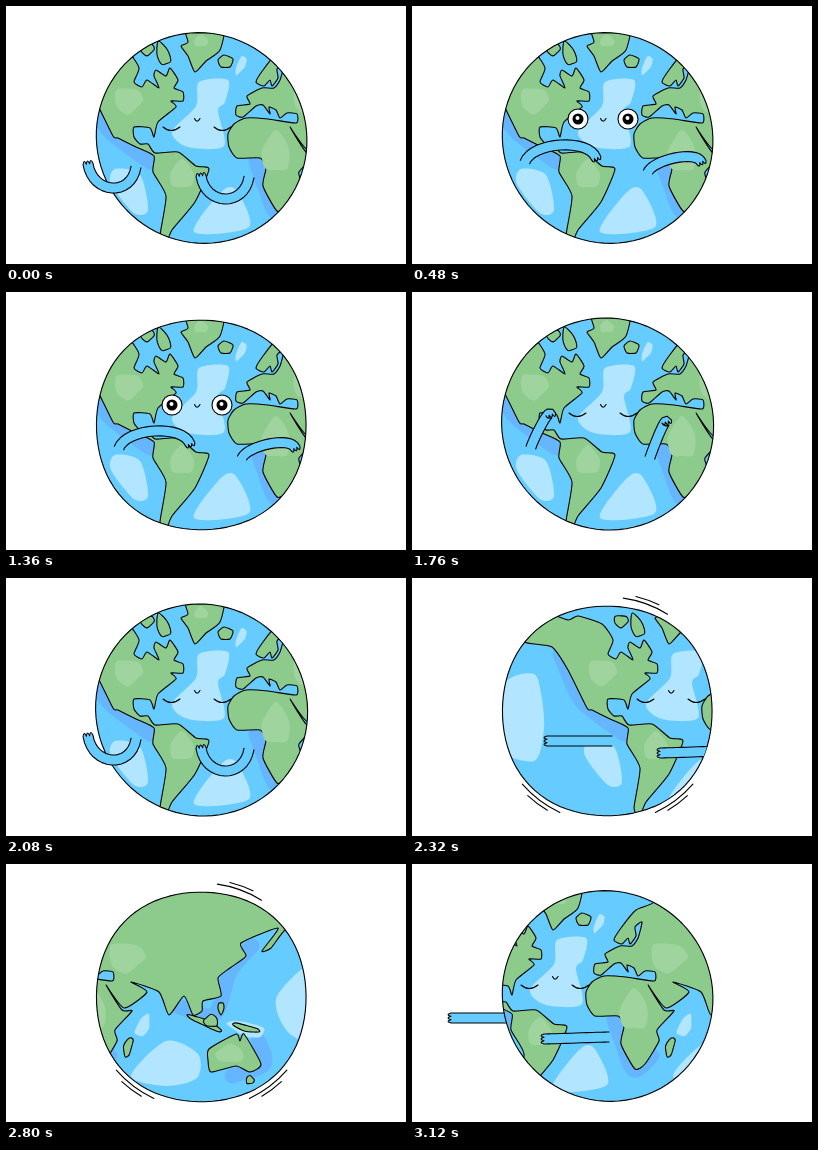
Animation, 400 px wide and 258 px high, one loop 3200 ms. Source, as an HTML page:

```html
<!DOCTYPE html>
<html lang="en">
<head>
<meta charset="utf-8">
<title>Spinning Earth</title>
<style>
  html, body { margin: 0; width: 100%; height: 100%; overflow: hidden; background: #fff; }
  svg { display: block; width: 400px; height: 258px; }
  path, circle { stroke-linecap: round; stroke-linejoin: round; }
  .line { fill: none; stroke: #000; stroke-width: 1.1; }
  .land { fill: #8ccb8c; stroke: #000; stroke-width: 1.1; }
  .arm { fill: #66ccff; stroke: #000; stroke-width: 1.1; }
  .deep { fill: none; stroke: #66b5ff; stroke-width: 15; }
  .foam { fill: #b2e5ff; }
  .meadow { fill: #a0d49e; }
</style>
</head>
<body>
<svg viewBox="0 0 400 258">
  <defs>
    <clipPath id="disc"><path class="outline"/></clipPath>
    <g id="map"></g>
  </defs>
  <path id="sideArm" class="arm" transform="translate(-28 -9)"/>
  <path class="outline" fill="#66ccff"/>
  <g clip-path="url(#disc)">
    <g id="world">
      <use href="#map"/>
      <use href="#map" x="-456"/>
    </g>
  </g>
  <path class="outline line"/>
  <g id="front">
    <g id="body">
      <path id="shut" class="line" d="M157 121q8 7 17 0m34 0q8 7 17 0"/>
      <g id="open">
        <g id="eye">
          <circle cx="166" cy="113" r="10" fill="#fff" stroke="#000" stroke-width="1.1"/>
          <circle cx="166" cy="113" r="5.5"/>
          <circle cx="165.5" cy="112" r="2" fill="#fff"/>
        </g>
        <use href="#eye" x="50"/>
      </g>
      <path class="line" d="M188.5 112.5q2.500 5.500 5.500 0"/>
      <path id="leftArm" class="arm"/>
      <path id="rightArm" class="arm"/>
    </g>
  </g>
  <path id="whoosh" class="line"/>
</svg>
<script>
const FRAME = 80, FRAMES = 40, SWING = 13, SPIN = 27, STEP = 34, LAP = 456;
const RAD = Math.PI / 180;
const $ = id => document.getElementById(id);
const clamp = t => Math.max(0, Math.min(1, t));
const ease = t => t * t * (3 - 2 * t);
const mix = (a, b, t) => a.map((v, i) => v + (b[i] - v) * t);

// Rounded curve through "x y x y ..."; k sets how round it is.
function curve(text, closed, k) {
  const v = text.split(/\s+/).map(Number), n = v.length / 2;
  const at = i => {
    const j = closed ? (i + n) % n : Math.max(0, Math.min(n - 1, i));
    return [v[2 * j], v[2 * j + 1]];
  };
  let d = 'M' + at(0);
  for (let i = 0; i < n - !closed; i++) {
    const [a, b, c, e] = [-1, 0, 1, 2].map(s => at(i + s));
    d += `C${b.map((p, m) => p + (c[m] - a[m]) * k)} ${c.map((p, m) => p - (e[m] - b[m]) * k)} ${c}`;
  }
  return d;
}

// Uneven oval
function blob(x, y, rx, ry, tilt = 0) {
  const pts = [];
  for (let a = 0; a < 360; a += 45) {
    const r = 1 + 0.15 * Math.sin(a * 3 * RAD + x);
    const u = rx * r * Math.cos(a * RAD), w = ry * r * Math.sin(a * RAD);
    const c = Math.cos(tilt * RAD), s = Math.sin(tilt * RAD);
    pts.push(x + u * c - w * s, y + u * s + w * c);
  }
  return curve(pts.join(' '), true, 0.15);
}

function add(cls, d) {
  const p = document.createElementNS('http://www.w3.org/2000/svg', 'path');
  p.setAttribute('class', cls);
  p.setAttribute('d', d);
  $('map').append(p);
}
const shore = s => add('deep', curve(s, false, 0.16));
const foam = s => add('foam', curve(s, true, 0.14));
const land = s => add('land', curve(s, true, 0.1));
const isle = (...b) => add('land', blob(...b));
const meadow = (...b) => add('meadow', blob(...b));

shore('80 76 98 118 114 134 144 156');
shore('250 156 258 178 270 206 288 192');
shore('355 142 392 150 408 108 430 82');
shore('410 212 442 200 436 176');

foam('193 76 222 74 219 96 212 105 218 140 182 141 166 126 190 100');
foam('215 186 230 184 243 221 188 226');
foam('109 163 134 169 142 204 128 207 105 178');
foam('29 101 54 96 61 115 64 150 54 183 12 170 -2 135');
foam('344 177 376 190 375 214 344 222 309 212');
add('foam', blob(235, 59, 4, 10, 25));
add('foam', blob(321, 162, 6, 12, 25));
add('foam', blob(425, 165, 19, 7, 15));

// The Americas
land(`38 36 36 45 44 64 72 69 88 92 107 130 112 132 130 141 148 150 147 166 160 190 154 230
  160 238 166 224 189 196 203 163 190 160 172 146 149 147 142 138 134 138 128 131 128 121 144 122
  148 131 152 116 170 101 165 95 177 95 177 86 168 82 172 74 164 62 160 70 150 64 148 70 153 82
  141 74 136 81 128 76 133 62 122 46 98 38 88 42 64 34`);
// Europe, Africa and Asia
land(`296 12 290 38 272 46 257 64 250 76 258 80 264 74 266 80 272 72 271 63 278 58 274 74 268 82
  256 82 241 90 244 98 231 100 230 109 237 111 250 100 257 99 264 108 263 101 270 104 274 112
  281 107 291 108 290 117 262 113 240 112 228 118 222 128 223 141 231 152 254 152 260 162 257 180
  271 205 281 200 295 177 293 166 310 147 300 146 284 121 302 144 325 128 309 118 337 128 347 151
  362 132 371 151 380 147 381 137 399 132 396 114 408 104 424 92 419 79 456 64 440 87 449 84
  463 66 486 54 465 10`);
// Greenland, Iceland, Australia
land('179 18 182 36 175 40 182 50 189 66 200 55 214 44 218 16');
land('212 54 218 49 227 53 224 61 215 61');
land('386 196 387 185 414 170 418 177 422 170 439 200 428 208 414 202 389 208');

isle(157, 48, 6, 12, -20);   // Arctic
isle(141, 43, 7, 6);
isle(306, 183, 4, 10, 15);   // Madagascar
isle(383, 159, 19, 3, 25);   // Sunda islands
isle(389, 157, 7, 6);
isle(399, 144, 3, 6);
isle(424, 164, 14, 3, 15);   // New Guinea
isle(428, 216, 4, 4);        // Tasmania
isle(462, 212, 4, 11, 30);   // New Zealand

meadow(122, 94, 14, 13);
meadow(176, 169, 12, 14);
meadow(270, 147, 14, 20);
meadow(195, 35, 7, 6);
meadow(304, 93, 18, 15);
meadow(408, 190, 14, 9);

// Arm poses: shoulder x y, hand x y, sag of the curve between them
const CURL = [130, 161, 82, 158, 30];
const REACH = [128, 155, 69, 149, 13];
const FOLD = [113, 156, 184, 152, -20];
const STRAIGHT = [132, 163, 67, 163, 0];

function armPath([sx, sy, hx, hy, sag]) {
  const near = [], far = [], half = 5, dx = (hx - sx) * 0.1;
  const bez = (a, b, c, d, t) => {
    const u = 1 - t;
    return [u * u * u * a + 3 * u * u * t * b + 3 * u * t * t * c + t * t * t * d,
            u * u * (b - a) + 2 * u * t * (c - b) + t * t * (d - c)];
  };
  let ux, uy;
  for (let i = 0; i <= 16; i++) {
    const [x, vx] = bez(sx, sx + dx, hx - dx, hx, i / 16);
    const [y, vy] = bez(sy, sy + sag, hy + sag, hy, i / 16);
    const len = Math.hypot(vx, vy) || 1;
    ux = vx / len; uy = vy / len;
    near.push([x - uy * half, y + ux * half]);
    far.unshift([x + uy * half, y - ux * half]);
  }
  // Three finger tips join the two edges
  const a = near.at(-1), b = far[0];
  let tips = '';
  for (let i = 1; i <= 3; i++) {
    const m = mix(a, b, (i - 0.5) / 3);
    tips += `Q${m[0] + ux * 6},${m[1] + uy * 6} ${mix(a, b, i / 3)}`;
  }
  return `M${near.join('L')}${tips}L${far.join('L')}`;
}

// 0 with the arms out to the left, 1 with them folded to the right
const swingAt = t => ease(clamp(Math.min(t / 3, (11 - t) / 3.5)));

function armAt(n) {
  if (n >= SPIN) return mix(CURL, STRAIGHT, clamp((n - SPIN + 1) / 2));
  const t = n % SWING, s = swingAt(t);
  const arm = mix(t < SWING / 2 ? CURL : REACH, FOLD, s);
  arm[3] -= 30 * Math.sin(Math.PI * s);
  return arm;
}

// The right arm is the left one moved over, and shorter when folded
const rightOf = ([sx, sy, hx, hy, sag], s) => {
  const x = sx + 113 + 10 * s;
  return [x, sy + 10, x + (hx - sx) * (1 - 0.25 * s), hy + 12 - 8 * s, sag * (1 - 0.4 * s)];
};

// Circle with a slight hand-drawn wobble, in three variants
const wobbles = [
  a => 105.3 + 1.3 * Math.sin(2 * a),
  a => 106.2 - 1.4 * Math.cos(4 * a) + Math.cos(a - 110 * RAD),
  a => 106 + Math.sin(2 * a)
];
function outline(n) {
  const m = n % 6, radius = wobbles[Math.min(m % 3 + (m === 4), 2) === 2 && m === 5 ? 1 : m % 3 + (m === 4)];
  let d = '';
  for (let a = 0; a < 360; a += 4) {
    const r = radius(a * RAD);
    d += `${a ? 'L' : 'M'}${195.6 + r * Math.cos(a * RAD)},${132 + r * Math.sin(a * RAD)}`;
  }
  return d + 'Z';
}

// Pairs of short arcs just outside the globe
function streaks(turn) {
  let d = '';
  for (const mid of [-70, 127, 53]) {
    for (const [r, half] of [[113, 12], [117, 6]]) {
      const at = a => `${195.6 + r * Math.cos(a * RAD)},${132 + r * Math.sin(a * RAD)}`;
      d += `M${at(mid + turn - half)}A${r} ${r} 0 0 1 ${at(mid + turn + half)}`;
    }
  }
  return d;
}

function draw(n) {
  const spinning = n > SPIN;
  const shift = spinning ? (n - SPIN) * STEP : 0;
  const back = shift > LAP / 2 ? shift - LAP : shift;
  const swing = n < SPIN ? swingAt(n % SWING) : 0;
  const arm = armAt(n), left = armPath(arm);
  const outside = back < 0 && back > -90;

  const edge = outline(n);
  document.querySelectorAll('.outline').forEach(o => o.setAttribute('d', edge));
  $('world').setAttribute('transform', `translate(${shift})`);
  $('body').setAttribute('transform', `translate(${back})`);
  $('front').setAttribute('clip-path', spinning ? 'url(#disc)' : 'none');

  $('leftArm').setAttribute('d', outside ? '' : left);
  $('sideArm').setAttribute('d', outside ? left : '');
  $('rightArm').setAttribute('d', armPath(rightOf(arm, swing)));

  $('open').style.display = swing > 0.7 ? '' : 'none';
  $('shut').style.display = swing > 0.7 ? 'none' : '';
  const windy = spinning && (n - SPIN - 1) % 6 < 2;
  $('whoosh').setAttribute('d', windy ? streaks(n % 2 ? 0 : 30) : '');
}

let start, last = -1;
function tick(now) {
  start ??= now;
  const n = Math.floor((now - start) / FRAME) % FRAMES;
  if (n !== last) draw(last = n);
  requestAnimationFrame(tick);
}
draw(0);
requestAnimationFrame(tick);
</script>
</body>
</html>
```
